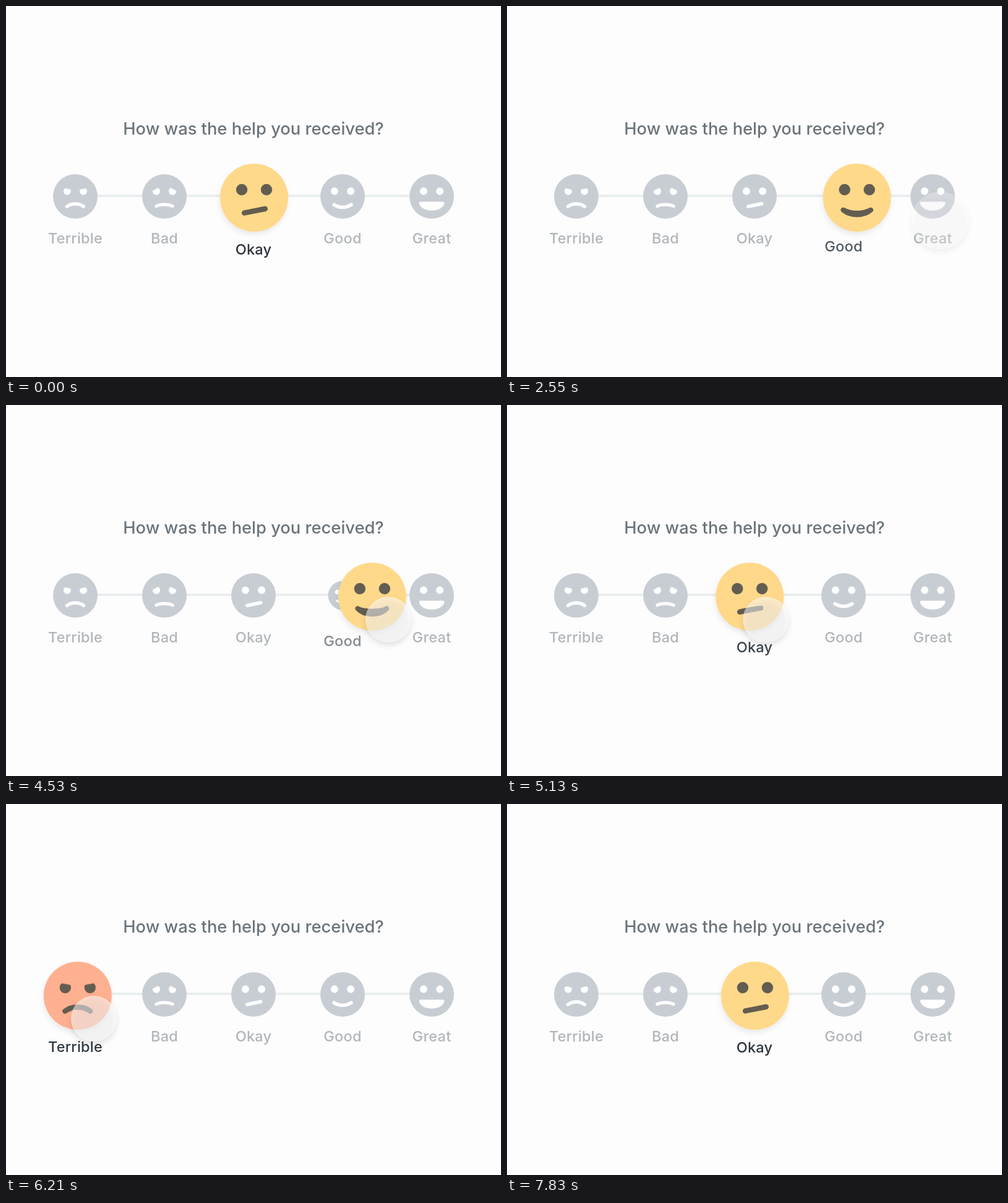
An HTML page that plays this animation: 800 px wide and 600 px high, repeating every 7.86 s.

```html
<!DOCTYPE html>
<html lang="en">
<head>
<meta charset="utf-8">
<title>Feedback slider</title>
<style>
  html, body { margin: 0; width: 100%; height: 100%; overflow: hidden; background: #fdfdfd; }
  svg { display: block; width: 800px; height: 600px; }
  text {
    font-family: Inter, "Open Sans", sans-serif;
    font-weight: 500;
    font-optical-sizing: none;
    text-anchor: middle;
  }
  .title { font-size: 27.3px; fill: #6a747a; }
  .label { font-size: 23.5px; letter-spacing: .25px; }
  .small { fill: #c8cdd4; }
  .small .ink { fill: #fff; stroke: #fff; }
  .big .ink { fill: #625d50; stroke: #625d50; }
  .ink { stroke-linejoin: round; stroke-linecap: round; }
  .eyes { stroke-width: .4; }
  .disc { filter: drop-shadow(-1px 5px 4px rgba(60, 70, 80, .1)); }
  .touch { fill: rgba(255, 255, 255, .53); filter: drop-shadow(0 5px 5px rgba(0, 0, 0, .2)); }
</style>
</head>
<body>
<svg viewBox="0 0 800 600">
  <rect x="112" y="305" width="576" height="4" fill="#e9eeef"/>
  <text class="title" x="400" y="208">How was the help you received?</text>
</svg>
<script>
const LOOP = 7860, STEP = 144, R = 55, EYE = 9;
const names = ['Terrible', 'Bad', 'Okay', 'Good', 'Great'];

// mouth: left end, right end, top bend, bottom bend, inset, line width; eye: cut distance, cut angle
const poses = [
  [-20.5, 25, 20.5, 25, -8.8, -8.8, 11, 8.5, 5.4, -79],
  [-20, 24, 20, 24, -5.5, -5.5, 10, 8, 5, -119],
  [-15.8, 24.7, 17.8, 18, 0, 0, 0, 8.5, 9, -119],
  [-21.3, 20.5, 21.3, 20.5, 8.3, 8.3, 13, 8.5, 9, -119],
  [-27.7, 16.5, 27.7, 16.5, 0, 20, 5, 7, 9, -119]
];

// start, duration, from, to
const moves = [
  [830, 550, 2, 3],
  [2420, 550, 3, 4],
  [3903, 2407, 4, 0],
  [7285, 550, 0, 2]
];

// press start, release start, x (null follows the face)
const touches = [
  [500, 830, 567],
  [2090, 2420, 700],
  [3470, 6310, null],
  [6955, 7285, 414]
];

const svg = document.querySelector('svg');
const clamp = v => Math.max(0, Math.min(1, v));
const mix = (a, b, t) => a + (b - a) * t;
const smooth = u => u * u * (3 - 2 * u);
const mixColor = (a, b, t) => `rgb(${a.map((v, i) => Math.round(mix(v, b[i], t)))})`;

function add(parent, tag, attrs = {}) {
  const el = document.createElementNS('http://www.w3.org/2000/svg', tag);
  set(el, attrs);
  return parent.appendChild(el);
}

function set(el, attrs) {
  for (const k in attrs) el.setAttribute(k, attrs[k]);
}

function poseAt(pos) {
  const i = Math.min(3, Math.floor(pos)), f = pos - i;
  const p = poses[i].map((v, k) => mix(v, poses[i + 1][k], f));
  if (i === 0) p[8] += 2.4 * Math.sin(Math.PI * f);
  return p;
}

function mouthPath([x0, y0, x1, y1, top, bottom, k]) {
  return `M${x0} ${y0}C${x0 + k} ${y0 + top} ${x1 - k} ${y1 + top} ${x1} ${y1}` +
    `C${x1 - k} ${y1 + bottom} ${x0 + k} ${y0 + bottom} ${x0} ${y0}Z`;
}

// A disc with a straight cut, mirrored for the right eye.
function eyePath(p, side) {
  const half = Math.acos(Math.min(.9999, p[8] / EYE)), mid = p[9] * Math.PI / 180;
  const pt = a => `${side * (-20 + EYE * Math.cos(a))} ${-13 + EYE * Math.sin(a)}`;
  return `M${pt(mid + half)}A${EYE} ${EYE} 0 1 ${side > 0 ? 1 : 0} ${pt(mid - half)}Z`;
}

function makeFace(kind) {
  const g = add(svg, 'g', { class: kind });
  return {
    g,
    disc: add(g, 'circle', { r: R, class: kind === 'big' ? 'disc' : '' }),
    eyes: add(g, 'path', { class: 'ink eyes' }),
    mouth: add(g, 'path', { class: 'ink' })
  };
}

function drawFeatures(face, pos) {
  const p = poseAt(pos);
  set(face.eyes, { d: eyePath(p, 1) + eyePath(p, -1) });
  set(face.mouth, { d: mouthPath(p), 'stroke-width': p[7] });
}

const smalls = names.map((name, i) => {
  const face = makeFace('small');
  drawFeatures(face, i);
  return face;
});
const labels = names.map((name, i) => {
  const el = add(svg, 'text', { class: 'label', x: 112 + STEP * i });
  el.textContent = name;
  return el;
});
const big = makeFace('big');
const touch = add(svg, 'circle', { class: 'touch', cy: 347 });

function positionAt(t) {
  let pos = 2;
  for (const [start, dur, from, to] of moves)
    if (t >= start) pos = mix(from, to, smooth(clamp((t - start) / dur)));
  return pos;
}

function drawTouch(t, faceX) {
  const hit = touches.find(([on, off]) => t >= on && t < off + 260);
  if (!hit) return set(touch, { opacity: 0 });
  const [on, off, x] = hit;
  const enter = clamp((t - on) / 300), leave = clamp((t - off) / 260);
  set(touch, {
    cx: x ?? faceX + 26,
    r: 37 + 19 * (1 - smooth(enter)) + 19 * smooth(leave),
    opacity: Math.min(1, enter * 2.2) * (1 - leave)
  });
}

function draw(t) {
  const pos = positionAt(t), x = 113 + STEP * pos;
  names.forEach((name, i) => {
    const near = clamp(1 - 2 * Math.abs(i - pos));
    const scale = 36 / R * (1 - near);
    set(smalls[i].g, { transform: `translate(${112 + STEP * i} 308) scale(${scale})` });
    set(labels[i], { y: 384 + 18 * near, fill: mixColor([176, 182, 186], [43, 52, 60], near) });
  });
  set(big.g, { transform: `translate(${x} 310)` });
  set(big.disc, { fill: mixColor([255, 176, 144], [255, 217, 138], clamp(pos / 2)) });
  drawFeatures(big, pos);
  drawTouch(t, x);
}

function tick() {
  draw(performance.now() % LOOP);
  requestAnimationFrame(tick);
}
tick();
</script>
</body>
</html>
```
